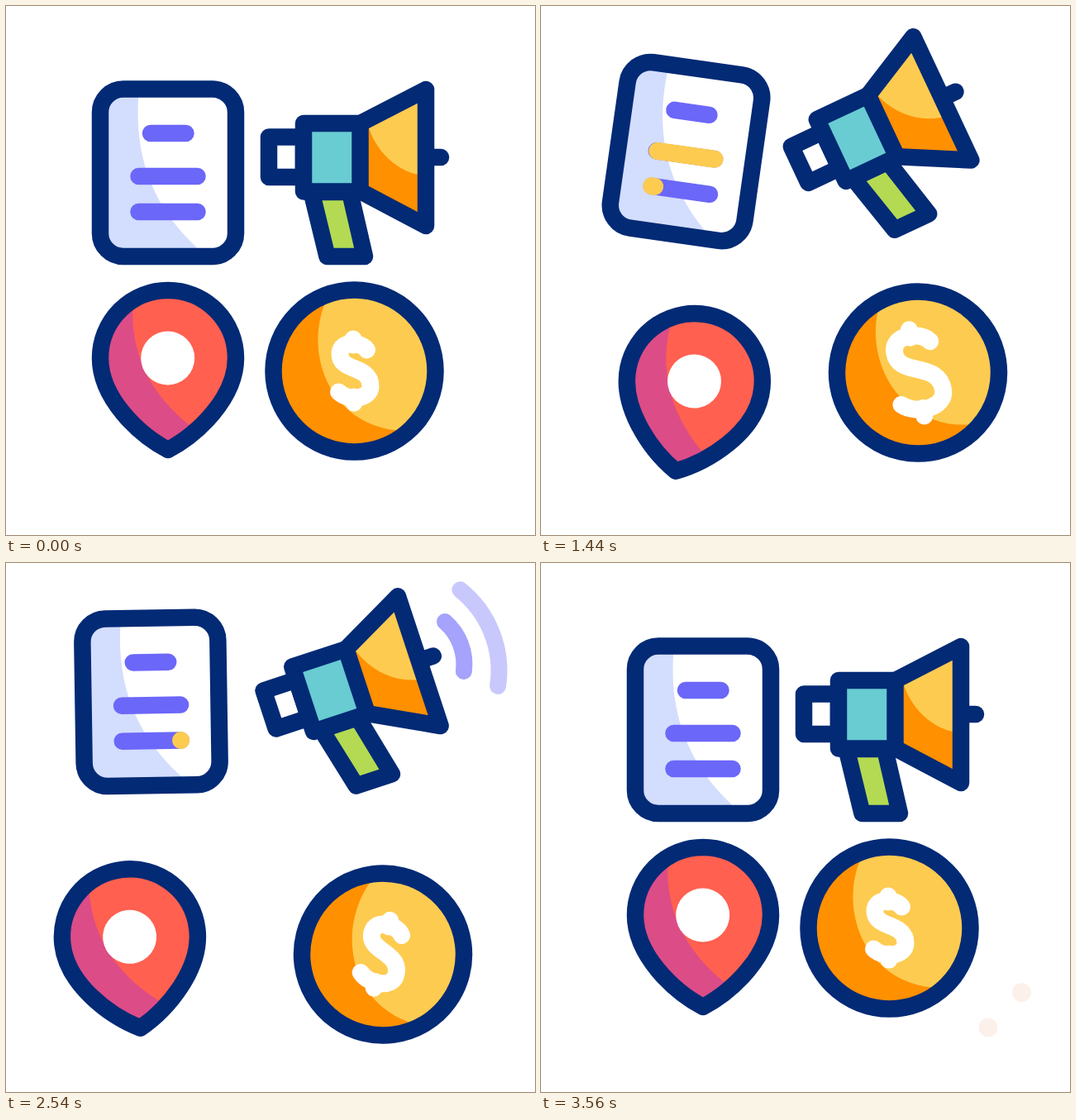
An HTML page for the animation above (3600 ms loop, 640 by 640 pixels).

```html
<!DOCTYPE html>
<html lang="en">
<head>
<meta charset="utf-8">
<title>Marketing icons</title>
<style>
  html, body { margin: 0; width: 100%; height: 100%; overflow: hidden; background: #fff; }
  svg { display: block; width: 640px; height: 640px; }
  .edge { fill: none; stroke: #032a75; stroke-width: 20.5; }
  .bar { stroke: #6b67f9; stroke-width: 20.5; }
  .mark { stroke: #fdcb50; stroke-width: 21; }
  .wave { fill: none; stroke: #6b67f9; stroke-width: 20; opacity: 0; }
  .sign path { fill: none; stroke: #fff; stroke-width: 21; vector-effect: non-scaling-stroke; }
</style>
</head>
<body>
<svg viewBox="0 0 640 640" stroke-linecap="round" stroke-linejoin="round">
  <g id="dots" fill="#fcf1ea" opacity="0">
    <circle cx="581.5" cy="519.5" r="11.5"/>
    <circle cx="541" cy="562" r="11.5"/>
  </g>

  <g id="doc">
    <rect x="114" y="100.5" width="164" height="202.5" rx="28" fill="#fff"/>
    <path fill="#d3ddfd" d="M161 101C152 190 185 255 243 303H142A28 28 0 0 1 114 275V128.5A28 28 0 0 1 142 100.5Z"/>
    <rect class="edge" x="114" y="100.5" width="164" height="202.5" rx="28"/>
    <g id="bars"></g>
  </g>

  <g id="horn">
    <path class="wave" d="M552.5 148A68 68 0 0 1 555.5 212"/>
    <path class="wave" d="M582 117A125 125 0 0 1 589 242"/>
    <path class="edge" d="M508 183H526"/>
    <path class="edge" style="fill:#b3da52" d="M369.5 225L388.5 303H434L416 225Z"/>
    <path class="edge" style="fill:#fff" d="M318 158.5H360V207H318Z"/>
    <path fill="#fdcb50" d="M428.5 142L508 101V266L428.5 224Z"/>
    <path fill="#ff9000" d="M436 136C442 168 467 199 503 205H508V266L428.5 224V142Z"/>
    <path class="edge" d="M428.5 142L508 101V266L428.5 224"/>
    <path class="edge" style="fill:#68ccd2" d="M360 142H428.5V224.5H360Z"/>
  </g>

  <g id="pin">
    <path fill="#ff6050" d="M196 537C160 518 114 474 114 426A82 82 0 0 1 278 426C278 474 232 518 196 537Z"/>
    <path fill="#dc4c87" d="M196 537C160 518 114 474 114 426A82 82 0 0 1 154 356C148 420 176 474 230 513Z"/>
    <path class="edge" d="M196 537C160 518 114 474 114 426A82 82 0 0 1 278 426C278 474 232 518 196 537Z"/>
    <circle cx="195.7" cy="426" r="32.5" fill="#fff"/>
  </g>

  <g id="coin">
    <circle cx="421.5" cy="441.5" r="98" fill="#fdcb50"/>
    <path fill="#ff9000" d="M391 348C354 420 395 515 486 514A98 98 0 1 1 391 348Z"/>
    <circle class="edge" cx="421.5" cy="441.5" r="98"/>
    <g id="sign" class="sign">
      <path d="M420 403V410M436.5 416C430 406 404 404 404 421C404 443 441 434 441 460C441 476 414 478 402.5 467M421 473V480"/>
    </g>
  </g>
</svg>
<script>
const LOOP = 3600, HALF = 400;
const $ = id => document.getElementById(id);
const clamp = x => Math.min(1, Math.max(0, x));
const smooth = x => { x = clamp(x); return x * x * (3 - 2 * x); };

// Value at time t from [time, value] steps
function at(steps, t, ease = smooth) {
  const i = steps.findIndex(s => s[0] > t);
  if (i < 0) return steps[steps.length - 1][1];
  if (i === 0) return steps[0][1];
  const [t0, a] = steps[i - 1], [t1, b] = steps[i];
  return a + (b - a) * ease((t - t0) / (t1 - t0));
}

// Rest, settle at mid, swing between a and b, come back to rest
function swing(rest, mid, start, first, a, b) {
  const steps = [[80, rest], [start, mid]];
  for (let k = 0; k < 7; k++) steps.push([first + k * HALF, k % 2 ? b : a]);
  return [...steps, [3380, rest]];
}

const away = [[80, 0], [300, 1], [3060, 1], [3370, 0]];
const docTurn = swing(0, 0, 270, 730, 10.8, -10.8);
const docLift = [[80, 0], [300, -24], [360, -24],
  [822, -42], [1222, -4], [1622, -42], [2022, -4], [2422, -42], [2822, -4],
  [3060, -24], [3360, 0]];
const hornTurn = swing(0, -16, 300, 702, -25.9, -14);
const pinTurn = swing(0, 0, 225, 668, 12.2, -12.5);
const coinTurn = swing(0, 0, 190, 588, -10.5, 15);
const coinDrop = swing(0, 24, 260, 692, 0, 47);
const signSize = swing(1, 1, 240, 668, 1.38, 1);
const waveFades = [
  [[790, 0], [1040, 1], [1250, 0]],
  [[840, 0], [1120, 1], [1190, 1], [1400, 0]]
];

const waves = document.querySelectorAll('.wave');
const rows = [[175, 217.5, 154], [160.5, 231.5, 206], [160.5, 231.5, 249]];

function addLine(cls, x1, x2, y) {
  const el = document.createElementNS('http://www.w3.org/2000/svg', 'line');
  const attrs = { class: cls, x1, x2, y1: y, y2: y };
  for (const k in attrs) el.setAttribute(k, attrs[k]);
  return $('bars').appendChild(el);
}
const marks = rows.map(([a, b, y]) => {
  addLine('bar', a, b, y);
  return addLine('mark', a, a, y);
});

function place(id, dx, dy, turn, px, py) {
  $(id).setAttribute('transform', `translate(${dx} ${dy}) rotate(${turn} ${px} ${py})`);
}

function draw(t) {
  const k = at(away, t);
  place('doc', -20.5 * k, at(docLift, t), at(docTurn, t), 196, 202);
  place('horn', 25 * k, -39 * k, at(hornTurn, t), 411, 274);
  place('pin', -33.2 * k, 25.6 * k, at(pinTurn, t), 195.7, 537.8);
  place('coin', 34.5 * k, at(coinDrop, t), at(coinTurn, t), 421.5, 441.5);
  $('sign').setAttribute('transform',
    `translate(421.5 441.5) scale(${at(signSize, t)}) translate(-421.5 -441.5)`);

  marks.forEach((el, i) => {
    const [a, b] = rows[i], s = 235 + 560 * i;
    const head = smooth((t - s) / 600), tail = smooth((t - s - 605) / 600);
    el.setAttribute('x1', a + (b - a) * tail);
    el.setAttribute('x2', a + (b - a) * head);
    el.style.display = head > tail ? '' : 'none';
  });

  const beat = t < 790 || t >= 3190 ? 0 : 790 + (t - 790) % (2 * HALF);
  waves.forEach((el, i) => {
    el.style.opacity = at(waveFades[i], beat, x => x);
  });
  $('dots').setAttribute('opacity', clamp((t - 3460) / 100));
}

const start = performance.now();
function tick() {
  draw((performance.now() - start) % LOOP);
  requestAnimationFrame(tick);
}
tick();
</script>
</body>
</html>
```
